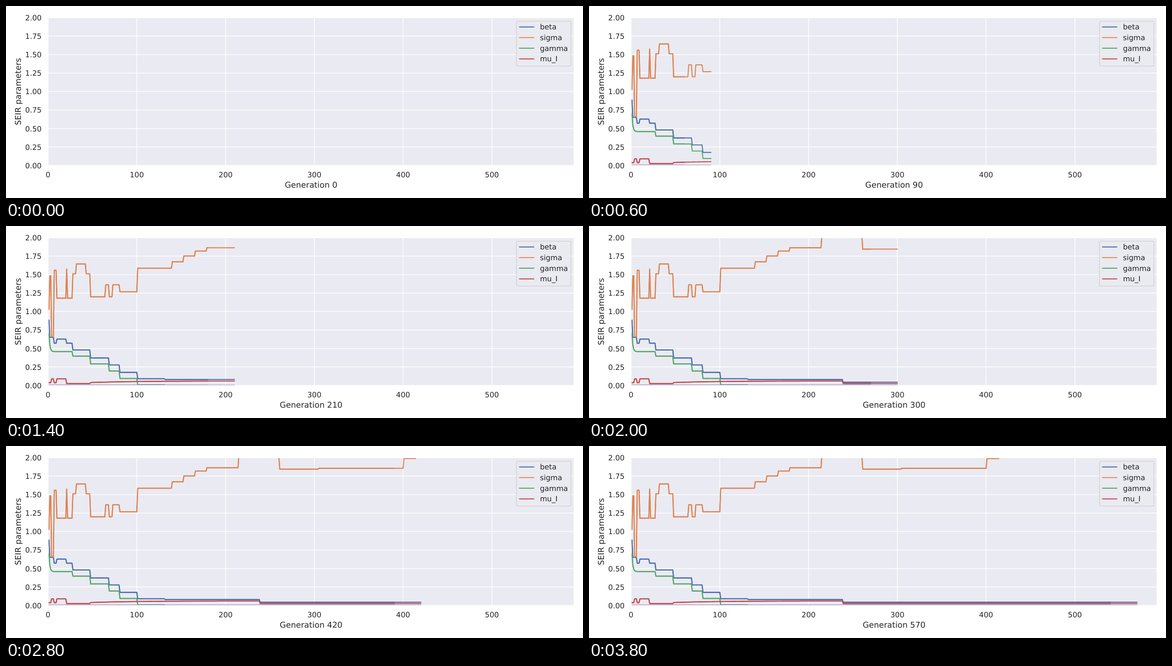
Animation, 1280 px wide and 427 px high, one loop 4 s. Source, as an HTML page:

```html
<!DOCTYPE html>
<html>
<head>
<meta charset="utf-8">
<style>
  html, body { margin: 0; width: 100%; height: 100%; overflow: hidden; background: #fff; }
  svg { display: block; width: 1280px; height: 427px; }
  text { font: 16.35px "DejaVu Sans", sans-serif; fill: #262626; text-rendering: geometricPrecision; }
  .label { font-size: 17.85px; text-anchor: middle; }
  .grid { stroke: #fff; stroke-width: 1.5; }
  .line { fill: none; stroke-width: 2.2; stroke-linecap: round; stroke-linejoin: round; }
  .past { stroke-width: 2.5; }
</style>
</head>
<body>
<svg viewBox="0 0 1280 427">
  <clipPath id="area"><rect x="93.3" y="26" width="1167" height="328.7"/></clipPath>
  <rect x="93.3" y="26" width="1167" height="328.7" fill="#eaeaf2"/>
  <g id="axes"></g>
  <g id="plot" clip-path="url(#area)"></g>
  <rect x="93.3" y="26" width="1167" height="328.7" fill="none" stroke="#fff" stroke-width="1.86"/>
  <g id="legend">
    <rect x="1132.5" y="33.8" width="120.8" height="99.6" rx="3" fill="#eaeaf2" fill-opacity=".8" stroke="#ccc" stroke-opacity=".8" stroke-width="1.49"/>
  </g>
  <text id="caption" class="label" x="676.8" y="404"></text>
  <text class="label" transform="translate(33 190.3) rotate(-90)">SEIR parameters</text>
</svg>
<script>
const STEP = 30, FRAMES = 20, FRAME_MS = 200;
const $ = id => document.getElementById(id);
const X = g => 93.3 + 1.9691 * g;
const Y = v => 354.7 - 164.35 * v;

function add(parent, tag, attrs, text = '') {
  const el = document.createElementNS('http://www.w3.org/2000/svg', tag);
  for (const k in attrs) el.setAttribute(k, attrs[k]);
  el.textContent = text;
  parent.append(el);
  return el;
}

// A key point [start, value] holds until the next one starts.
const hold = (g, keys) => keys.findLast(([start]) => start <= g)[1];
const within = (g, from, to) => g >= from && g <= to;

function beta(g) {
  return hold(g, [[1, .885], [2, .65], [7, .571], [10, .628], [21, .572], [28, .48],
    [48, .373], [69, .278], [81, .177], [101, .091], [132, .081], [239, .044]]);
}

// Decays to a plateau, then follows beta at a fixed distance.
function gamma(g) {
  return g < 28 ? .459 + .241 * Math.exp(1 - g) : beta(g) - .082;
}

function sigma(g) {
  if (within(g, 140, 214)) {
    // Four ever smaller steps up to a plateau.
    const k = Math.min(4, Math.floor((g - 127) / 13));
    return 1.864 - .277 * (1 - k / 4) ** 1.3;
  }
  return hold(g, [[1, 1.03], [2, 1.485], [4, .66], [7, 1.56], [10, 1.181], [21, 1.575],
    [22, 1.181], [28, 1.512], [32, 1.645], [43, 1.512], [48, 1.2], [65, 1.362], [69, 1.2],
    [73, 1.362], [81, 1.269], [101, 1.587], [215, 2.035], [261, 1.845], [305, 1.856],
    [401, 1.988], [415, 2.04]]);
}

function mu(g) {
  if (g < 21) return within(g, 4, 6) || g > 9 ? .09 : .038;
  if (g < 48 || g > 238) return .026;
  return .061 - .021 * Math.exp((48 - g) / 50);
}

const series = [
  { name: 'beta', color: '#4c72b0', value: beta },
  { name: 'sigma', color: '#dd8452', value: sigma },
  { name: 'gamma', color: '#55a868', value: gamma },
  { name: 'mu_I', color: '#c44e52', value: mu },
  { color: '#8172b3', value: () => .004 }
];

function trace(value, end) {
  let d = '';
  for (let g = 1; g <= end; g++)
    d += (d ? 'L' : 'M') + X(g).toFixed(2) + ' ' + Y(value(g)).toFixed(2);
  return d;
}

for (let g = 0; g < 600; g += 100) {
  add($('axes'), 'path', { class: 'grid', d: `M${X(g)} 26V354.7` });
  add($('axes'), 'text', { x: X(g), y: 381.3, 'text-anchor': 'middle' }, g);
}
for (let v = 0; v <= 2; v += .25) {
  add($('axes'), 'path', { class: 'grid', d: `M93.3 ${Y(v)}H1260.3` });
  add($('axes'), 'text', { x: 79, y: Y(v) + 6, 'text-anchor': 'end' }, v.toFixed(2));
}
series.forEach((s, i) => {
  s.past = add($('plot'), 'path', { class: 'line past', stroke: s.color });
  s.now = add($('plot'), 'path', { class: 'line', stroke: s.color });
  if (!s.name) return;
  const y = 46.6 + 23.65 * i;
  add($('legend'), 'path', { class: 'line', stroke: s.color, d: `M1139 ${y}H1171` });
  add($('legend'), 'text', { x: 1184.4, y: y + 5.8 }, s.name);
});

let shown = -1;
function draw() {
  const n = Math.floor(performance.now() / FRAME_MS) % FRAMES;
  if (n !== shown) {
    shown = n;
    const end = n * STEP;
    for (const { value, past, now } of series) {
      past.setAttribute('d', trace(value, end - STEP));
      now.setAttribute('d', trace(value, end));
    }
    $('caption').textContent = 'Generation ' + end;
  }
  requestAnimationFrame(draw);
}
draw();
</script>
</body>
</html>
```
